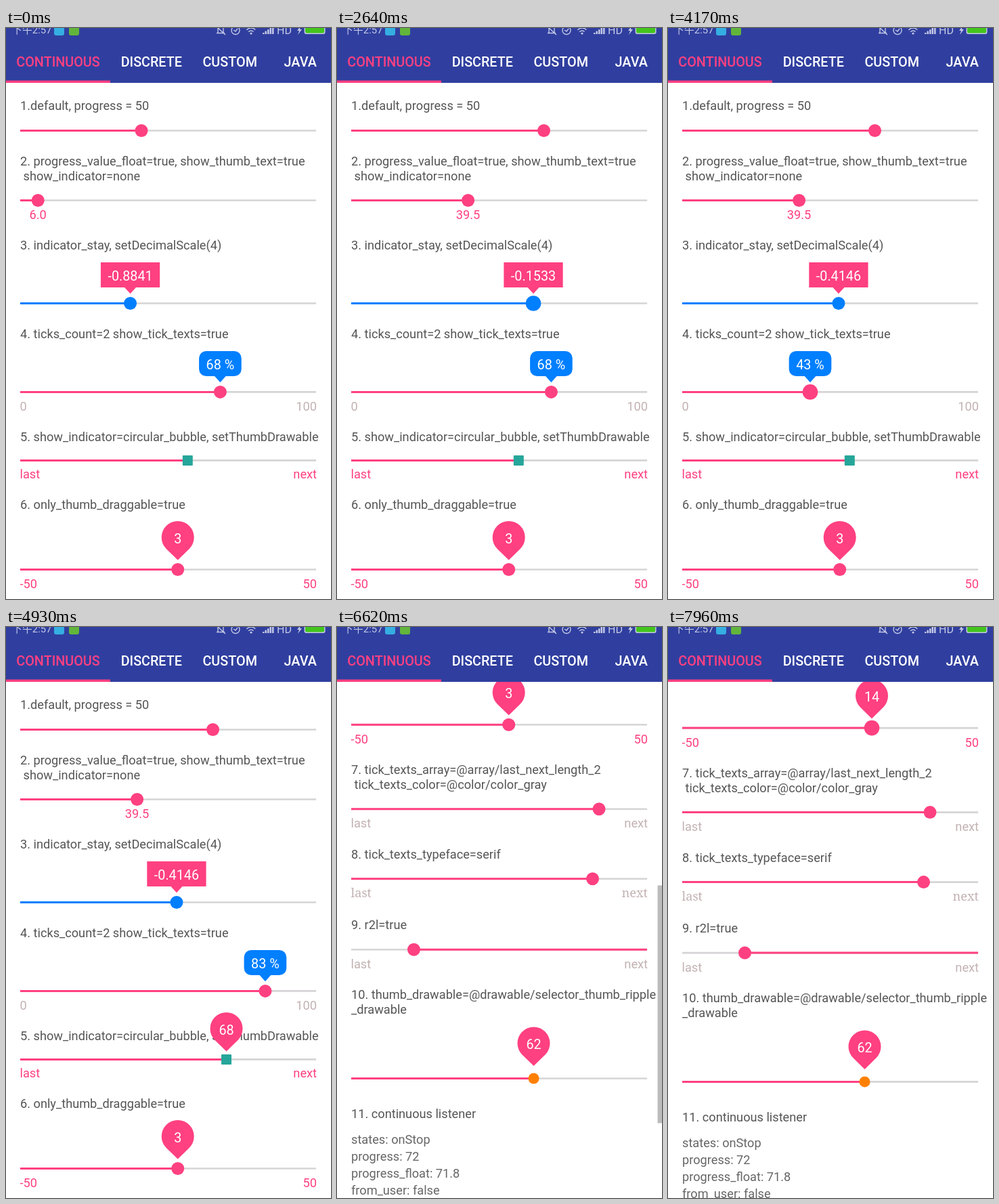
Animation of 480x843 px, one loop 8 s. Source, as an HTML page with a canvas:

```html
<!DOCTYPE html>
<html lang="en">
<meta charset="utf-8">
<title>Seek bars</title>
<style>
html, body { margin: 0; height: 100%; overflow: hidden; background: #fff }
canvas { display: block; width: 480px; height: 843px }
</style>
<canvas id="stage"></canvas>
<script>
const W = 480, H = 843, LOOP = 8000, STEP = 94, LEAD = 14;
const LEFT = 21, RIGHT = 458, HEADER = 81;
const PINK = '#ff4081', BLUE = '#007fff', GRAY = '#c3b2b2', TEXT = '#555', NAVY = '#303f9f';
const SANS = 'Roboto, sans-serif', SERIF = '"Noto Serif", serif';

const canvas = document.getElementById('stage'), c = canvas.getContext('2d');
const ratio = window.devicePixelRatio || 1;
canvas.width = W * ratio;
canvas.height = H * ratio;

// Each run is [start time, values], one value per screen update.
function track(t, rest, runs = []) {
  let value = rest;
  for (const [start, values] of runs) {
    const i = Math.floor((t + LEAD - start) / STEP);
    if (i >= 0) value = values[Math.min(i, values.length - 1)];
  }
  return value;
}
const within = (t, span) => !!span && t + LEAD >= span[0] && t + LEAD < span[1];

const scrollRuns = [
  [5500, [20, 60, 112, 168.4, 300, 440, 570, 655.3]],
  [6620, [655.3, 630, 600, 600, 620, 640]],
  [7320, [646]], [7370, [650.4]]
];

const sliders = [
  { y: 151.5, x: 200, titles: [[115, '1.default, progress = 50']],
    runs: [[90, [211]], [270, [290, 355, 385, 330, 200, 89, 160, 270, 305.5]]],
    press: [90, 1120], tip: 'round', show: [270, 1120] },
  { y: 254.5, x: 47.2, thumbText: true,
    titles: [[197, '2. progress_value_float=true, show_thumb_text=true'], [218.3, ' show_indicator=none']],
    runs: [[1120, [47.2, 60, 110, 170, 230.8, 300, 360, 391, 334]], [1970, [210, 107, 160, 193.6]]],
    press: [1210, 2260] },
  { y: 406.5, x: 183.55, color: BLUE, min: -2, max: 1, digits: 4, tip: 'rect',
    titles: [[321, '3. indicator_stay, setDecimalScale(4)']],
    runs: [[2450, [222]], [2640, [290, 380, 440, 380, 260, 140, 65, 130, 230]], [3500, [251.94]]],
    press: [2450, 3500] },
  { y: 537.4, x: 316.4, tip: 'round', tipColor: BLUE, unit: ' %', ticks: ['0', '100'], tickColor: GRAY,
    titles: [[452, '4. ticks_count=2 show_tick_texts=true']],
    runs: [[3590, [336, 270, 150, 60, 24, 90, 210, 335]], [4370, [416, 382.9]]],
    press: [3590, 4660] },
  { y: 638.4, x: 268.3, min: -6, thumb: 'square', tip: 'bubble', lift: 45.4, ticks: ['last', 'next'], tickGap: 20,
    titles: [[604, '5. show_indicator=circular_bubble, setThumbDrawable']],
    runs: [[4660, [275, 290, 308, 325.5, 411, 300, 140, 70, 152]]], show: [4660, 5500] },
  { y: 799.5, x: 253.7, min: -50, max: 50, tip: 'bubble', lift: 47.5, ticks: ['-50', '50'],
    titles: [[703.3, '6. only_thumb_draggable=true']],
    runs: [[7370, [260]], [7570, [264, 272, 281, 291, 301]]], press: [7320, LOOP + LEAD] },
  { y: 924, x: 387, ticks: ['last', 'next'], tickColor: GRAY,
    titles: [[866.3, '7. tick_texts_array=@array/last_next_length_2'], [887.7, ' tick_texts_color=@color/color_gray']] },
  { y: 1027, x: 377.5, ticks: ['last', 'next'], tickColor: GRAY, tickFont: SERIF,
    titles: [[991, '8. tick_texts_typeface=serif']] },
  { y: 1131.5, x: 113.5, reversed: true, ticks: ['last', 'next'], tickColor: GRAY,
    titles: [[1095, '9. r2l=true']] },
  { y: 1321.8, x: 290.5, thumb: 'small', tip: 'bubble', lift: 52,
    titles: [[1198.3, '10. thumb_drawable=@drawable/selector_thumb_ripple'], [1219.5, '_drawable']] }
];

const listener = [
  [1374, '11. continuous listener'], [1412, 'states: onStop', '#666'], [1437, 'progress: 72', '#666'],
  [1462, 'progress_float: 71.8', '#666'], [1487, 'from_user: false', '#666']
];

// y is the middle of the capital letters.
function text(s, x, y, color = TEXT, size = 18.2, align = 'left', family = SANS, weight = 400) {
  c.font = `${weight} ${size}px ${family}`;
  c.textAlign = align;
  c.fillStyle = color;
  c.fillText(s, x, y + size * 0.355);
}
function rect(x, y, w, h, color, radius = 0) {
  c.fillStyle = color;
  c.beginPath();
  c.roundRect(x, y, w, h, radius);
  c.fill();
}
function disc(x, y, r, color) {
  c.fillStyle = color;
  c.beginPath();
  c.arc(x, y, r, 0, 7);
  c.fill();
}
function polygon(points, color) {
  c.fillStyle = color;
  c.beginPath();
  points.forEach(p => c.lineTo(...p));
  c.fill();
}

function drawTip(s, x, label) {
  const color = s.tipColor || PINK;
  if (s.tip === 'bubble') {
    const cy = s.y - s.lift, r = 24;
    c.fillStyle = color;
    c.beginPath();
    c.arc(x, cy, r, Math.PI * 0.75, Math.PI * 0.25);
    c.lineTo(x, cy + r * 1.4);
    c.fill();
    text(label, x, cy + 1.5, '#fff', 19.8, 'center');
    return;
  }
  c.font = `400 19.8px ${SANS}`;
  const w = c.measureText(label).width + 21;
  const left = Math.max(0, Math.min(W - w, x - w / 2));
  const top = s.y - 60.4, bottom = top + 37;
  rect(left, top, w, 37, color, s.tip === 'round' ? 10.5 : 0);
  polygon([[x - 8.5, bottom - 0.2], [x + 8.5, bottom - 0.2], [x, bottom + 9.2]], color);
  text(label, left + w / 2, top + 20, '#fff', 19.8, 'center');
}

function drawSlider(s, t) {
  const { y, color = PINK, min = 0, max = 100, tickColor = PINK, tickGap = 21.3 } = s;
  const x = track(t, s.x, s.runs);
  const value = min + (max - min) * (x - LEFT) / (RIGHT - LEFT);
  s.titles.forEach(([ty, line]) => text(line, LEFT, ty));
  rect(LEFT, y - 1.3, RIGHT - LEFT, 2.6, '#d6d4d6');
  if (s.reversed) rect(x, y - 1.5, RIGHT - x, 3, color);
  else rect(LEFT, y - 1.5, x - LEFT, 3, color);

  if (s.thumb === 'square') rect(x - 7.5, y - 7.5, 15, 15, '#26a69a', 1);
  else if (s.thumb === 'small') disc(x, y, 8, '#ff8000');
  else disc(x, y, within(t, s.press) ? 11.3 : 9.5, color);

  if (s.thumbText) text(value.toFixed(1), x, y + tickGap, PINK, 18.2, 'center');
  if (s.ticks) {
    text(s.ticks[0], LEFT - 0.5, y + tickGap, tickColor, 18.2, 'left', s.tickFont);
    text(s.ticks[1], RIGHT + 1, y + tickGap, tickColor, 18.2, 'right', s.tickFont);
  }
}

function drawStatusBar() {
  const pale = '#c3c8e6';
  text('下午2:57', 9, 3, pale, 14.9, 'left', 'Roboto, "Noto Sans CJK SC", "Noto Sans CJK", sans-serif');
  rect(71, -4, 15, 15, '#35aee2', 3);
  rect(93, -4, 15, 15, '#62b53b', 3);
  c.strokeStyle = pale;
  c.lineWidth = 1.4;
  c.beginPath();
  c.moveTo(311, 7.5); c.lineTo(323, 7.5);
  c.moveTo(313, 7); c.lineTo(313, -1);
  c.moveTo(321, 7); c.lineTo(321, -1);
  c.moveTo(311, -2); c.lineTo(324, 10);
  c.moveTo(345, 3.5); c.arc(339, 3.5, 6, 0, 7);
  c.moveTo(336, 3); c.lineTo(339, 5); c.lineTo(342, 1);
  for (const r of [5, 9, 13]) {
    c.moveTo(362 - r * 0.7, 9 - r * 0.7);
    c.arc(362, 9, r, Math.PI * 1.25, Math.PI * 1.75);
  }
  c.stroke();
  disc(362, 8, 1.6, pale);
  for (let i = 0; i < 5; i++) rect(379 + i * 3.5, 7 - i * 2.4, 2.5, 2 + i * 2.4, pale);
  text('HD', 400, 3, pale, 16);
  polygon([[435, -3], [430, 4], [433, 4], [431, 10], [437, 2], [434, 2]], pale);
  rect(440.5, -5, 31, 14, pale, 3);
  rect(442, -5, 28, 12.5, '#42c51c', 2);
}

function drawHeader() {
  rect(0, 0, W, HEADER, NAVY);
  drawStatusBar();
  const tabs = [['CONTINUOUS', 77], ['DISCRETE', 214.8], ['CUSTOM', 330.7], ['JAVA', 434.8]];
  tabs.forEach(([name, x], i) => text(name, x, 49.5, i ? '#fff' : PINK, 19.8, 'center', SANS, 500));
  rect(0, 77.5, 154, 3.5, PINK);
}

function drawScrollbar(t, scroll) {
  const alpha = t + LEAD < 5500 ? 0 : Math.min(1, Math.max(0, (7800 - t) / 250));
  c.globalAlpha = alpha;
  rect(473.5, 80 + scroll * 0.46, 6.5, 351, '#bcbcbc');
  c.globalAlpha = 1;
}

function draw(t) {
  const scroll = track(t, 0, scrollRuns);
  c.setTransform(ratio, 0, 0, ratio, 0, 0);
  rect(0, 0, W, H, '#fff');
  c.save();
  c.translate(0, -scroll);
  sliders.forEach(s => drawSlider(s, t));
  listener.forEach(([y, line, color]) => text(line, LEFT, y, color));
  for (const s of sliders) {
    if (!s.tip || (s.show && !within(t, s.show))) continue;
    const { min = 0, max = 100, digits = 0, unit = '' } = s;
    const x = track(t, s.x, s.runs);
    const value = min + (max - min) * (x - LEFT) / (RIGHT - LEFT);
    drawTip(s, x, value.toFixed(digits) + unit);
  }
  c.restore();
  drawScrollbar(t, scroll);
  drawHeader();
}

function loop() {
  draw(performance.now() % LOOP);
  requestAnimationFrame(loop);
}
loop();
</script>
</html>
```
